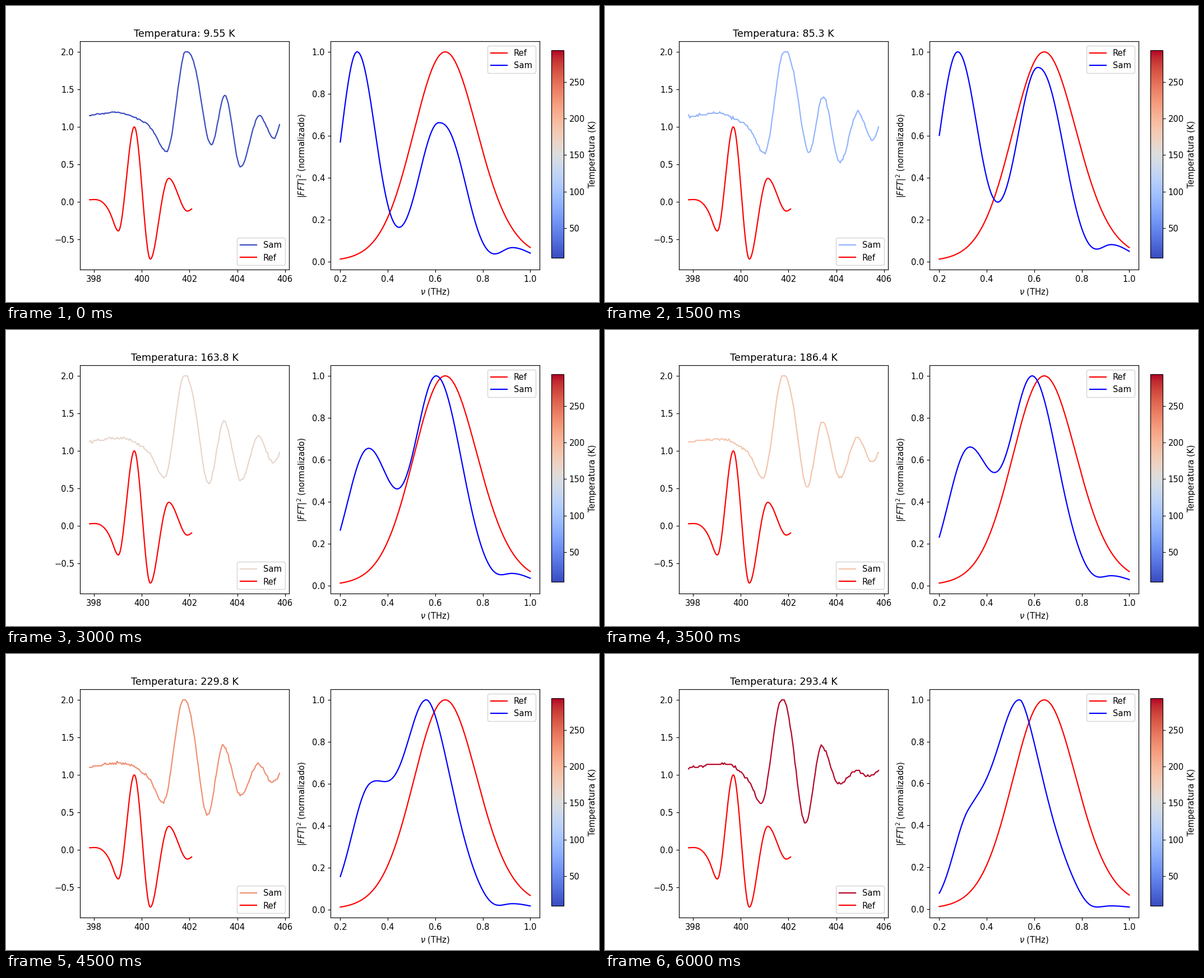
A matplotlib script for the animation above (6.5 s loop, 1058 by 529 pixels).

```python
import numpy as np
import matplotlib.pyplot as plt
from matplotlib.animation import FuncAnimation
from matplotlib.cm import ScalarMappable
from matplotlib.colors import Normalize

plt.rcParams["font.family"] = "DejaVu Sans"

TEMPS = [9.55, 31.5, 53.7, 85.3, 115.5, 140.2, 163.8,
         186.4, 208.5, 229.8, 251.3, 272.3, 293.4]

# Turning points of the pulses: time offset from 400 and amplitude
REF_PULSE = [(-2.19, .028), (-1.98, .031), (-1.51, -.052), (-1.255, -.209),
             (-.985, -.388), (-.315, 1), (.355, -.763), (.743, -.18),
             (1.13, .314), (1.905, -.123), (2.085, -.095)]
COLD_PULSE = [(-2.19, 1.149), (-1.11, 1.194), (0, 1.075), (.52, .92),
              (1.04, .67), (1.86, 2.02), (2.34, 1.63), (2.91, .76),
              (3.48, 1.42), (4.14, .47), (4.93, 1.15), (5.54, .85),
              (5.772, 1.045)]
HOT_PULSE = [(-2.19, 1.09), (-.57, 1.146), (0, 1.03), (.42, .87),
             (.84, .61), (1.73, 2.02), (2.18, 1.41), (2.7, .36),
             (3.39, 1.38), (4.1, .88), (4.86, 1.06), (5.36, .98),
             (5.772, 1.06)]


def ease(x):
    x = np.clip(x, 0, 1)
    return x * x * (3 - 2 * x)


def spline(points, x):
    """Cubic spline, level at every local extremum of its points."""
    px, py = np.asarray(points, float).T
    h = np.diff(px)
    d = np.diff(py) / h
    n = len(px)
    a, b = np.eye(n), np.zeros(n)
    a[0, :2], b[0] = (2, 1), 3 * d[0]
    a[-1, -2:], b[-1] = (1, 2), 3 * d[-1]
    for i in range(1, n - 1):
        if d[i - 1] * d[i] > 0:
            left, right = 1 / h[i - 1], 1 / h[i]
            a[i, i - 1:i + 2] = left, 2 * (left + right), right
            b[i] = 3 * (d[i - 1] * left + d[i] * right)
    m = np.linalg.solve(a, b)
    k = np.clip(np.searchsorted(px, x, side="right") - 1, 0, n - 2)
    u = (x - px[k]) / h[k]
    return (py[k] + (py[k + 1] - py[k]) * ease(u)
            + h[k] * u * (1 - u) * (m[k] * (1 - u) - m[k + 1] * u))


def peak(x, center, left, right):
    """Gaussian with a different width on each side."""
    sigma = np.where(x < center, left, right)
    return np.exp(-((x - center) / sigma) ** 2 / 2)


def sample_pulse(frame):
    u = frame / (len(TEMPS) - 1)
    t = t_sam - 400
    cold, hot = np.array(COLD_PULSE), np.array(HOT_PULSE)
    y = spline(cold + (hot - cold) * u, t)
    # Late echo, strongest halfway through the warm-up
    y += (.09 * np.sin(np.pi * u) * ease((t - 3.6) / .8)
          * np.cos(2 * np.pi * (t - 4.9) / 1.4))
    noise, step = (.009, .02) if frame else (.006, .005)
    y += np.random.default_rng(frame).normal(0, noise, len(y))
    return np.minimum(np.round(y / step) * step, 2)


def sample_spectrum(frame):
    u = frame / (len(TEMPS) - 1)

    low = peak(freq, .271 + .052 * ease((u - .15) / .45),
               .067 + .02 * np.sin(np.pi * u) ** 2,
               .077 + .015 * ease(u / .5))
    low *= 1.51 - .86 * ease(u / .5) - .25 * ease((u - .6) / .4)

    center = .615 - .072 * ease((u - .35) / .65)
    above = np.maximum(freq - center, 0)
    main = peak(freq, center, .084 + .016 * u, np.inf)
    main *= np.exp(-(above / (.14 + .015 * u)) ** (2.45 - .9 * u)
                   - (above / .28) ** 8)

    bump = (.1 - .085 * ease(u)) * peak(freq, .925, .05, .075)
    y = low + main + bump
    return y / y.max()


t_ref = np.linspace(397.81, 402.085, 200)
t_sam = np.linspace(397.81, 405.772, 160)
freq = np.linspace(.2, 1, 400)
shift = freq - .642
ref_spectrum = np.exp(-shift**2 * (27.4 - 5.12 * shift - 34.9 * shift**2))

cmap = plt.get_cmap("coolwarm")
norm = Normalize(TEMPS[0], TEMPS[-1])

fig, (ax_time, ax_freq) = plt.subplots(1, 2, figsize=(10, 5), dpi=105.8)

sam_line, = ax_time.plot(t_sam, sample_pulse(0), label="Sam")
ax_time.plot(t_ref, spline(REF_PULSE, t_ref - 400), "r", label="Ref")
ax_time.set_ylim(-.901, 2.138)
time_legend = ax_time.legend(loc="lower right")
title = ax_time.set_title("")

ax_freq.plot(freq, ref_spectrum, "r", label="Ref")
spectrum_line, = ax_freq.plot(freq, sample_spectrum(0), "b", label="Sam")
ax_freq.set_xlabel(r"$\nu$ (THz)")
ax_freq.set_ylabel(r"$|FFT|^2$ (normalizado)")
ax_freq.legend(loc="upper right")

bar_ax = fig.add_axes([.92, .15, .02, .7])
fig.colorbar(ScalarMappable(norm, cmap), cax=bar_ax, label="Temperatura (K)")


def update(frame):
    temp = TEMPS[frame]
    color = cmap(norm(temp))
    title.set_text(f"Temperatura: {temp} K")
    sam_line.set_ydata(sample_pulse(frame))
    sam_line.set_color(color)
    time_legend.get_lines()[0].set_color(color)
    spectrum_line.set_ydata(sample_spectrum(frame))
    ax_freq.relim()
    ax_freq.autoscale_view()
    return sam_line, spectrum_line, title


anim = FuncAnimation(fig, update, frames=len(TEMPS), interval=500,
                     repeat=True, repeat_delay=0)
plt.show()
```
